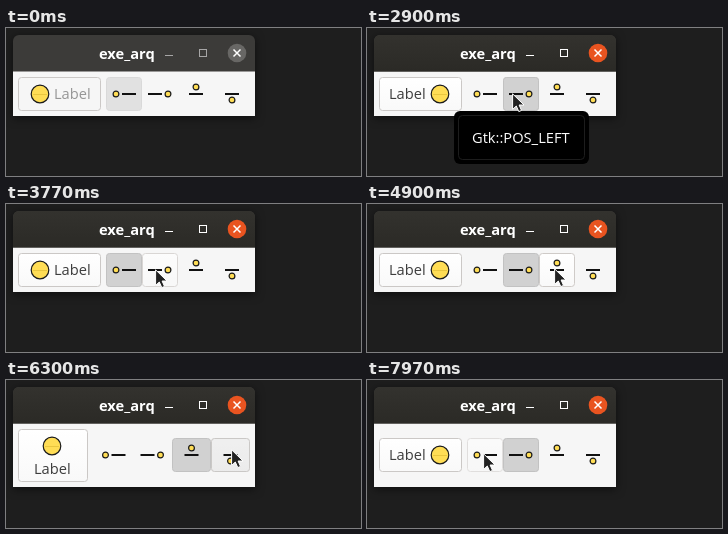
Write an HTML page that moves like this. It is 355 px wide and 148 px high and loops after 8000 ms.

```html
<!DOCTYPE html>
<html lang="en">
<head>
<meta charset="utf-8">
<title>Icon position demo</title>
<style>
  html, body { margin: 0; width: 100%; height: 100%; overflow: hidden; background: #1e1e1e; }
  svg { display: block; width: 355px; height: 148px; }
  text { font: 14.67px "Open Sans", "Noto Sans", sans-serif; }
  .title { font-weight: 700; fill: #fff; }
  .shadow { filter: drop-shadow(0 2px 5px rgba(0, 0, 0, .55)); }
  .dot { fill: #fd5; stroke: #1a1a1a; stroke-width: 1.2; }
  .bar { fill: #111; }
  .hover { fill: url(#raised); stroke: #cfcbc8; }
  .dark { fill: #d1d1d1; stroke: #c2c2c2; }
</style>
</head>
<body>
<svg viewBox="0 0 355 148">
  <defs>
    <linearGradient id="raised" x2="0" y2="1">
      <stop stop-color="#fff"/><stop offset="1" stop-color="#f9f9f9"/>
    </linearGradient>
    <linearGradient id="header" x2="0" y2="1">
      <stop stop-color="#33322e"/><stop offset="1" stop-color="#2b2a26"/>
    </linearGradient>
  </defs>

  <g class="shadow">
    <path d="M7 44V13a6 6 0 0 1 6-6H243a6 6 0 0 1 6 6V44z" fill="#3c3b39"/>
    <rect id="body" x="7" y="43.5" width="242" fill="#f6f6f6"/>
  </g>
  <path id="active" d="M7 43.5V13a6 6 0 0 1 6-6H243a6 6 0 0 1 6 6V43.5z" fill="url(#header)"/>
  <text class="title" x="93" y="31">exe_arq</text>
  <g id="controls">
    <rect x="159" y="27" width="8" height="1" fill="#fff"/>
    <rect x="193.5" y="21.5" width="7" height="7" fill="none" stroke="#fff"/>
  </g>
  <circle id="close" cx="231" cy="25" r="9.3"/>
  <path d="M227.5 21.5l7 7m0-7l-7 7" stroke="#fff" stroke-width="1.5"/>

  <rect id="frame" x="12.5" rx="3" fill="url(#raised)" stroke="#cbc8c6"/>
  <g id="icon">
    <circle r="8.8" class="dot"/>
    <path d="M-7 .5H7" stroke="#e9c63f"/>
  </g>
  <text id="label">Label</text>
  <g id="buttons"></g>

  <g id="tip">
    <rect x="87" y="83" width="135" height="53" rx="6"/>
    <rect x="91.5" y="87.5" width="126" height="44" rx="4" fill="none" stroke="#1d1d1d"/>
    <text x="105" y="115" fill="#fff">Gtk::POS_LEFT</text>
  </g>
  <path id="cursor" d="M.6 .8V16.4L4.3 13L6.8 18.6L9.5 17.4L7.1 12H12z"
        fill="#222" stroke="#fff" stroke-linejoin="round"/>
</svg>

<script>
const LOOP = 8000, TICK = 200 / 3, FADE = 200;
const $ = id => document.getElementById(id);
const set = (el, attrs) => { for (const k in attrs) el.setAttribute(k, attrs[k]); };
const clamp = v => Math.max(0, Math.min(1, v));

// Pointer path: time, x, y
const path = [
  [500, 143, 132], [567, 148, 113], [633, 154, 96], [700, 157, 84], [767, 157, 84],
  [833, 155, 75], [1033, 155, 75], [1100, 155, 71], [1167, 155, 71], [1367, 155, 65],
  [2833, 155, 65], [2900, 145, 65], [3100, 120, 66], [3500, 118, 66], [3633, 130, 66],
  [3767, 149, 65], [3900, 154, 65], [4500, 154, 65], [4900, 187, 64], [5033, 185, 64],
  [5700, 185, 64], [6033, 222, 69], [6300, 225, 69], [6900, 225, 69],
  [7300, 162, 71], [7433, 154, 70], [7767, 154, 70], [7967, 116, 73]
];

// Layout of the label button from each click on: time, mode
const modes = [[0, 'right'], [1490, 'left'], [3430, 'right'], [4300, 'left'],
               [5165, 'below'], [6365, 'above'], [7565, 'left']];

// Each position button: symbol parts, hover spans, pressed or checked spans
const specs = [
  { bar: -2, dot: [-8, 0], hover: [[3020, 3620], [7860, 9000]],
    dark: [[-999, 1490], [3230, 4300]] },
  { bar: -12, dot: [8, 0], hover: [[1230, 3020], [3620, 4700], [7200, 7860]],
    dark: [[1300, 3430], [4170, 5165], [7430, 9000]] },
  { bar: -7, dot: [0, -7], hover: [[4700, 5850], [7030, 7200]], dark: [[5030, 6365]] },
  { bar: -7, dot: [0, 6], hover: [[5850, 7030]], dark: [[6235, 7565]] }
];

const level = (t, spans) => Math.max(...spans.map(([on, off]) =>
  Math.min(clamp((t - on) / FADE), 1 - clamp((t - off) / FADE))));

function make(parent, tag, attrs) {
  const el = document.createElementNS('http://www.w3.org/2000/svg', tag);
  set(el, attrs);
  return parent.appendChild(el);
}

const buttons = specs.map(spec => {
  const g = make($('buttons'), 'g', {});
  const back = name => make(g, 'rect', { class: name, y: -16.5, height: 33, rx: 3 });
  const hover = back('hover'), dark = back('dark');
  make(g, 'rect', { class: 'bar', x: spec.bar, y: -1, width: 14, height: 2 });
  make(g, 'circle', { class: 'dot', cx: spec.dot[0], cy: spec.dot[1], r: 2.9 });
  return { g, hover, dark, spec };
});

function pointer(t) {
  const i = path.findIndex(p => p[0] > t);
  if (i < 0) return path[path.length - 1].slice(1);
  const [t0, x0, y0] = path[i - 1], [t1, x1, y1] = path[i];
  const k = (t - t0) / (t1 - t0);
  return [x0 + (x1 - x0) * k, y0 + (y1 - y0) * k].map(Math.round);
}

function layout(t) {
  const mode = modes.filter(m => m[0] <= t).pop()[1];
  const tall = t >= 5165, stacked = mode === 'below' || mode === 'above';
  const mid = tall ? 75 : 66;
  const spots = {
    right: [34, mid, 48, mid + 5], left: [73, mid, 22, mid + 5],
    below: [46, 66, 28, 94], above: [46, 85, 28, 68]
  };
  const [ix, iy, lx, ly] = spots[mode];
  set($('body'), { height: (tall ? 107 : 88) - 43.5 });
  set($('frame'), { y: stacked ? 49.5 : mid - 16.5, width: stacked ? 69 : 82, height: stacked ? 52 : 33 });
  set($('icon'), { transform: `translate(${ix} ${iy})` });
  set($('label'), { x: lx, y: ly });
  return { mid, start: stacked ? 88 : 100, step: stacked ? 39 : 36 };
}

function draw(t) {
  const focus = clamp((t - 1230) / FADE), focused = t >= 1290;
  const { mid, start, step } = layout(t);

  set($('active'), { opacity: focus });
  set($('controls'), { opacity: focused ? 1 : .55 });
  set($('close'), { fill: focused ? '#e95420' : '#686765' });
  const grey = Math.round(150 - 89 * focus);
  set($('label'), { fill: `rgb(${grey},${grey},${grey})` });
  set($('frame'), { 'fill-opacity': focus });

  buttons.forEach(({ g, hover, dark, spec }, i) => {
    set(g, { transform: `translate(${start + step * (i + .5)} ${mid})` });
    const box = { x: .5 - step / 2, width: step - 1 };
    set(hover, { ...box, opacity: level(t, spec.hover) });
    set(dark, { ...box, opacity: level(t, spec.dark) * (.55 + .45 * focus) });
  });

  set($('tip'), { opacity: Math.min(clamp((t - 1570) / FADE), 1 - clamp((t - 2900) / FADE)) });
  const shown = t >= path[0][0];
  set($('cursor'), { visibility: shown ? 'visible' : 'hidden' });
  if (shown) set($('cursor'), { transform: `translate(${pointer(t)})` });
}

function loop(now) {
  const t = now % LOOP;
  draw(Math.max(0, Math.floor((t - 32) / TICK) * TICK + 34));
  requestAnimationFrame(loop);
}
draw(0);
requestAnimationFrame(loop);
</script>
</body>
</html>
```
